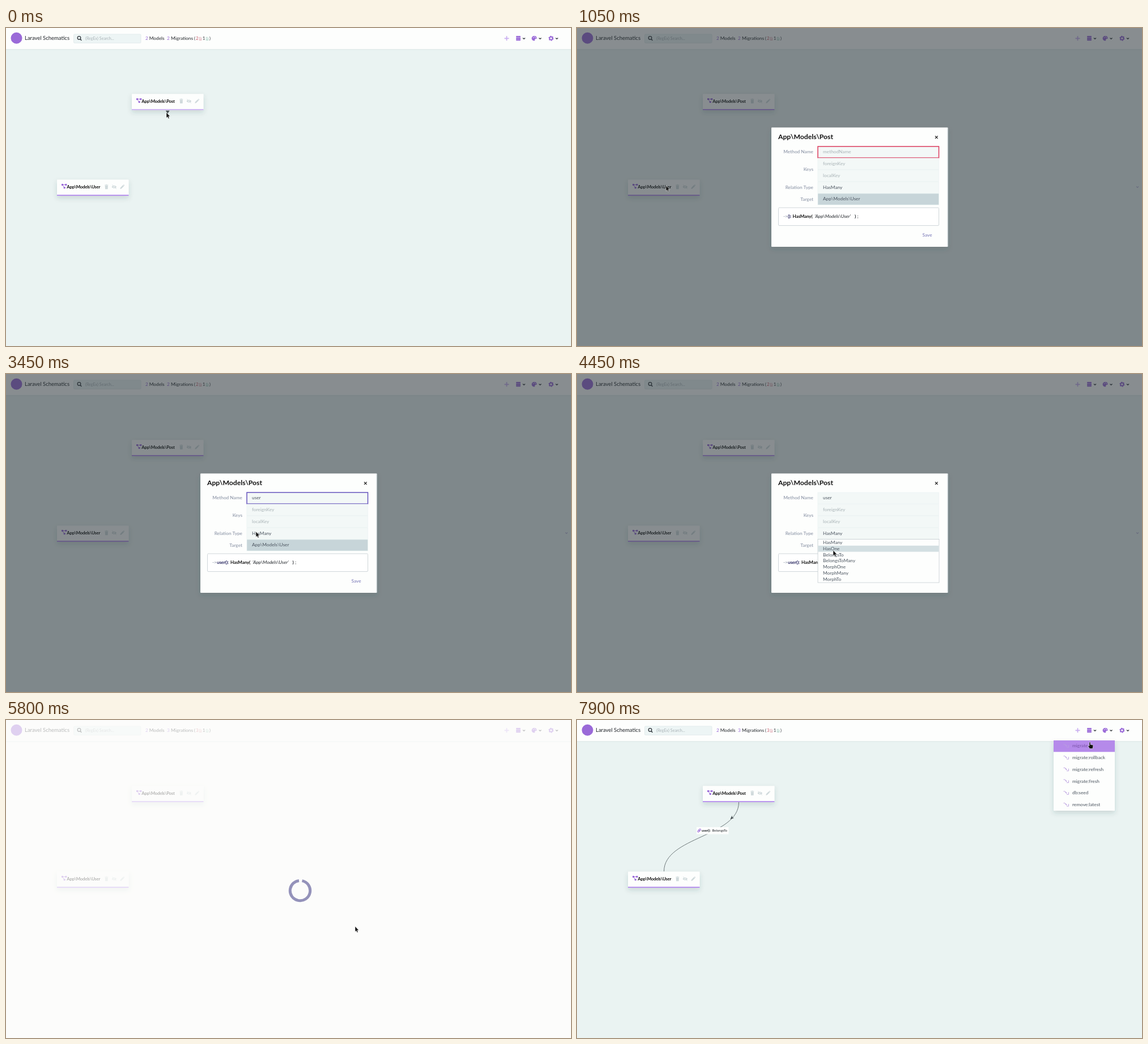
Recreate the animation shown at these times as an HTML page. Size 997 px wide and 561 px high, loop 8000 ms.

```html
<!DOCTYPE html>
<html lang="en">
<head>
<meta charset="utf-8">
<title>Schematics</title>
<style>
  html, body { margin: 0; width: 100%; height: 100%; overflow: hidden; background: #eaf3f2; }
  svg { display: block; width: 100%; height: 100%; }
  text { font: 8.3px Lato, sans-serif; fill: #1f2328; white-space: pre; }
  .line { fill: none; stroke: #606a6c; stroke-width: .9; }
  .accent { fill: #9a6ad8; }
  .muted { fill: #d0dadc; }
  .label { fill: #8b94a6; text-anchor: end; font-weight: 500; }
  .hint { fill: #a9b3b7; }
  .field { fill: #f3f8f7; stroke: #e8f0f0; stroke-width: .6; }
  .value { fill: #4c5560; }
  .bold { font-weight: 700; }
  .name { font-size: 7.8px; font-weight: 700; letter-spacing: -.25px; fill: #111; }
  .tiny { font-size: 6px; }
</style>
</head>
<body>
<svg viewBox="0 0 997 561" preserveAspectRatio="none">
  <defs>
    <filter id="shadow" x="-20%" y="-40%" width="140%" height="220%">
      <feDropShadow dx="0" dy="4" stdDeviation="4" flood-color="#33454c" flood-opacity=".17"/>
    </filter>
    <g id="chevron"><path d="M-2-1 0 1 2-1" fill="none" stroke="#33383d" stroke-width="1.2"/></g>
    <g id="sheet"><path d="M0 0h2.7l1.3 1.3V5H0zM1 2.3h2M1 3.6h2" fill="none" stroke="currentColor" stroke-width=".7"/></g>
    <g id="tree">
      <path d="M1.5 1.5H7.5M1.5 1.5 5 7" stroke="#9a6ad8" stroke-width=".9"/>
      <path class="accent" d="M0 0h3v3H0zM6.3 0h3v3h-3zM3.7 5.2h3v3h-3z"/>
    </g>
    <g id="tools" class="muted">
      <path d="M-3-3.8h2l.5-.7h1l.5.7h2v1h-6zM-2.6-2.3h5.2L2.3 4h-4.6z"/>
      <path d="M9 0q4.5-5 9 0-4.5 5-9 0z"/>
      <circle cx="13.5" r="1.4" fill="#fff"/>
      <path d="M10-3.4 17.4 3.4" stroke="#d0dadc"/>
      <path d="M24 3.8l.5-2.3 4.6-4.6 1.8 1.8-4.6 4.6zM29.6-3.5l.8-.7 1.7 1.7-.8.7z"/>
    </g>
  </defs>

  <rect id="stage" width="997" height="561"/>

  <g id="header">
    <rect width="997" height="37.5" fill="#fdfefd"/>
    <path d="M0 38H997" stroke="#dbe4e5"/>
    <circle class="accent" cx="18.5" cy="17.8" r="10"/>
    <text x="33" y="21.3" style="font-size:9.5px">Laravel Schematics</text>
    <rect x="119.5" y="11" width="118.500" height="15.500" rx="1.500" fill="#edf5f5" stroke="#dfe9ea" stroke-width=".8"/>
    <path d="M131 19.600 133.300 22" stroke="#30363b" stroke-width="1.500"/>
    <circle cx="129" cy="17.500" r="2.800" fill="none" stroke="#30363b" stroke-width="1.300"/>
    <text class="hint" x="140" y="20.600" style="font-size:7.1px">(RegEx) Search...</text>
    <text class="accent" x="246" y="21.300">2</text><text x="252.800" y="21.300">Models</text>
    <text id="migrations" class="accent" x="284" y="21.300"></text><text x="291" y="21.300">Migrations</text>
    <text x="332" y="21.300" style="font-size:7px">(</text>
    <text id="pending" x="335.300" y="21.300" style="font-size:7px;fill:#c34a5c"></text>
    <use href="#sheet" x="341" y="16.500" color="#dc9ca6"/>
    <text x="347" y="21.300" style="font-size:7px">1</text>
    <use href="#sheet" x="353" y="16.500" color="#9cc9bb"/>
    <text x="359" y="21.300" style="font-size:7px">)</text>
    <path d="M879.500 18.300h8M883.500 14.300v8" stroke="#c9aef0" stroke-width="1.700"/>
    <g class="accent">
      <rect x="900" y="14" width="8" height="2.500" rx="1"/>
      <rect x="900" y="16.900" width="8" height="2.300" rx=".5"/>
      <rect x="900" y="19.600" width="8" height="2.600" rx="1"/>
      <path d="M932.500 14a4.300 4.300 0 1 0 0 8.500q1.500-.5.600-2.200 0-1.100 1.500-1.100 2.200.2 2.200-1.700Q936 14 932.500 14z"/>
    </g>
    <g fill="#fff"><circle cx="930.500" cy="17" r=".7"/><circle cx="932.700" cy="15.700" r=".7"/><circle cx="934.800" cy="17" r=".7"/></g>
    <circle cx="961.800" cy="18.200" r="2.600" fill="none" stroke="#9a6ad8" stroke-width="2"/>
    <circle cx="961.800" cy="18.200" r="3.900" fill="none" stroke="#9a6ad8" stroke-width="1.300" stroke-dasharray="2 2.084"/>
    <use href="#chevron" x="914" y="18.500"/><use href="#chevron" x="942.500" y="18.500"/><use href="#chevron" x="972" y="18.500"/>
  </g>

  <path id="drag" class="line"/>
  <g id="relation">
    <path class="line" d="M285.500 145C285.500 206 153.500 206 153.500 267"/>
    <path d="M270.500 175 273.500 168.500 274 171.800 277 173z" fill="#454d50"/>
    <rect x="211" y="189" width="56.500" height="12.500" fill="#fdfefd"/>
    <g fill="none" stroke="#9a6ad8" stroke-width="1" transform="rotate(-45 215.500 195)">
      <rect x="212.200" y="193.700" width="4" height="2.600" rx="1.300"/><rect x="215" y="193.700" width="4" height="2.600" rx="1.300"/>
    </g>
    <text class="tiny bold" x="220" y="197.200" style="letter-spacing:-.1px">user():</text>
    <text class="tiny" x="238.500" y="197.200">BelongsTo</text>
  </g>
  <g id="cards"></g>
  <path id="anchor" d="M281.800 145.800h6.800l-3.400 5.200z" fill="#454d50"/>

  <g id="menu"></g>

  <g id="dialog">
    <rect width="997" height="561" fill="#283237" opacity=".55"/>
    <path d="M987-.9 989 1 991-.9" transform="translate(0 280.500)" fill="none" stroke="#5b5a78"/>
    <rect x="343" y="175.500" width="311.500" height="210.500" rx="1" fill="#fdfefd" filter="url(#shadow)"/>
    <path d="M653.700 176V386" stroke="#dbe5e8"/>
    <text class="bold" x="355" y="196" style="font-size:12.200px;fill:#111">App\Models\Post</text>
    <path d="M632 190.500l4.600 4.600m0-4.600-4.600 4.600" stroke="#222" stroke-width="1.200"/>
    <g id="fields"></g>
    <rect x="355.500" y="317" width="283" height="31.500" rx="1.500" fill="#fff" stroke="#cbd3d6" stroke-width=".9"/>
    <text x="364" y="335" class="label" style="text-anchor:start">-&gt;</text>
    <text id="method" class="bold" x="372" y="335" style="fill:#2c2a63;letter-spacing:-.25px"></text>
    <g id="call">
      <text id="callName" class="bold" y="335" style="font-size:8px;letter-spacing:-.1px;fill:#111"></text>
      <g id="callArgs">
        <text y="335" style="font-style:italic">'App\Models\User'</text>
        <text class="bold" x="70.500" y="335">)</text><text x="75" y="335">;</text>
      </g>
    </g>
    <rect id="saveRing" x="601" y="352.500" width="34" height="25.500" rx="1" fill="#f8fbfb" stroke="#ef7f9d" stroke-width="1.200"/>
    <text id="save" x="618" y="367.800" text-anchor="middle">Save</text>
    <g id="options"></g>
  </g>

  <g id="loading">
    <rect width="997" height="561" fill="#fcfdfb" opacity=".7"/>
    <circle id="spinner" cx="519" cy="301" r="17.700" fill="none" stroke="#9492ba" stroke-width="5" pathLength="100" stroke-dasharray="95 5"/>
  </g>

  <g id="cursor" stroke="#fff" stroke-width=".5">
    <path id="arrow" d="M0 0V9.600L2.100 7.700 3.600 11 5.200 10.300 3.800 7H6.500z" fill="#111"/>
    <path id="hand" d="M-1 .6Q0-.8 1 .6V4.300L5 5Q6 5.300 5.800 6.800L5 11.500H-.3L-3 7.200Q-3.300 5.800-2 6L-1 7z" fill="#111"/>
  </g>
</svg>

<script>
const $ = id => document.getElementById(id);
const show = (id, on) => { $(id).style.display = on ? '' : 'none'; };
const attrs = (id, values) => { for (const key in values) $(id).setAttribute(key, values[key]); };
const write = (id, text) => { if ($(id).textContent !== text) $(id).textContent = text; };

const card = (id, x, y, name) => `<g transform="translate(${x} ${y})">
  <rect id="${id}Body" width="126.500" height="28.500" rx="1" filter="url(#shadow)"/>
  <rect id="${id}Edge" y="26.700" width="126.500" height="1.800"/>
  <use href="#tree" x="8" y="7.600"/>
  <text class="name" x="17.300" y="15.600">App\\Models\\${name}</text>
  <use href="#tools" x="87.300" y="12.700"/></g>`;
$('cards').innerHTML = card('post', 222, 116.3, 'Post') + card('user', 90, 267.5, 'User');

const field = (id, y) => `<rect id="${id}Box" class="field" x="425" y="${y}" width="213.500" height="20"/>
  <text id="${id}" class="value" x="434" y="${y + 12.3}"></text>`;
const label = (text, y) => `<text class="label" x="417" y="${y}">${text}</text>`;
$('fields').innerHTML =
  ['methodField', 'foreignField', 'keyField', 'typeField', 'targetField']
    .map((id, i) => field(id, 209 + i * 20.75)).join('') +
  label('Method Name', 221.3) + label('Keys', 252.3) + label('Relation Type', 283.6) + label('Target', 304.5);
$('foreignField').setAttribute('class', 'hint');
$('keyField').setAttribute('class', 'hint');
write('foreignField', 'foreignKey');
write('targetField', 'App\\Models\\User');
$('targetFieldBox').style.fill = '#c7d5d9';

const optionHeight = 10.8;
$('options').innerHTML = `<rect x="425" y="291.500" width="214" height="76.500" fill="#fdfefd" stroke="#bcc7ca" stroke-width=".7"/>` +
  `<rect id="optionMark" x="425.500" width="213" height="${optionHeight}" fill="#d3dfe2"/>` +
  ['HasMany', 'HasOne', 'BelongsTo', 'BelongsToMany', 'MorphOne', 'MorphMany', 'MorphTo']
    .map((name, i) => `<text class="value" x="434" y="${300 + i * optionHeight}">${name}</text>`).join('');

$('menu').innerHTML = `<rect x="841" y="36" width="108" height="124" fill="#fdfefd" filter="url(#shadow)"/>
  <rect id="menuMark" x="841" y="36" width="108" height="20.300" fill="#b58aea"/>` +
  ['migrate', 'migrate:rollback', 'migrate:refresh', 'migrate:fresh', 'db:seed', 'remove:latest'].map((name, i) => {
    const y = 45.5 + i * 20.75;
    return `<path d="M858.500 ${y - 2.5}q2-1.500 3 1t3 2.500M861.500 ${y - 2.5}l3 3M864 ${y + 2.8}h3.500v-4" fill="none" stroke="#b99ddf" stroke-width=".9"/>
      <text id="item${i}" class="value" x="874" y="${y + 2.8}">${name}</text>`;
  }).join('');

// time, x, y of the pointer tip
const pointer = [
  [0, 283, 149], [50, 283, 149], [900, 157, 278], [2200, 157, 278], [2480, 330, 352], [2750, 475, 320],
  [3100, 475, 320], [3450, 441, 278], [3650, 441, 278], [4150, 449, 300], [4250, 449, 300],
  [4450, 452, 311], [4550, 452, 311], [4600, 452, 316], [5100, 452, 316], [5600, 616, 364],
  [6250, 616, 364], [7050, 904, 17], [7350, 904, 17], [7850, 905, 39], [8000, 905, 39]
];
const ease = u => u * u * (3 - 2 * u);
function pointerAt(t) {
  const i = pointer.findIndex(k => k[0] > t);
  const [t0, x0, y0] = pointer[i - 1], [t1, x1, y1] = pointer[i];
  const u = ease((t - t0) / (t1 - t0));
  return [x0 + (x1 - x0) * u, y0 + (y1 - y0) * u];
}

function render(t) {
  const [x, y] = pointerAt(t);
  const dragging = t < 1050, open = t >= 1050 && t < 5800, loading = t >= 5800 && t < 5950;
  const overUser = t >= 850 && t < 1050;

  $('stage').style.fill = loading ? '#fcfdfb' : '#eaf3f2';
  const count = t < 5800 ? '2' : '3';
  write('migrations', count);
  write('pending', count);

  show('anchor', dragging);
  show('drag', dragging && t >= 50);
  const endX = x + 2.5, endY = y + 1, midY = (148 + endY) / 2;
  attrs('drag', { d: `M285.500 148C285.500 ${midY} ${endX} ${midY} ${endX} ${endY}` });
  attrs('postBody', { fill: '#fdfefd' });
  attrs('postEdge', { fill: dragging ? '#cbb2f2' : '#b48bee' });
  attrs('userBody', { fill: overUser ? '#f5f8f8' : '#fdfefd' });
  attrs('userEdge', { fill: overUser ? '#9a6fe0' : '#b48bee' });
  show('relation', t >= 5950);

  show('dialog', open);
  const typed = 'user'.slice(0, Math.max(0, Math.min(4, Math.floor((t - 1100) / 150))));
  write('methodField', typed || 'methodName');
  $('methodField').setAttribute('class', typed ? 'value' : 'hint');
  const focused = t < 3650;
  $('methodFieldBox').style.cssText = focused ? `stroke:${typed ? '#6553bd' : '#dc3a5c'};stroke-width:1.5` : '';
  const belongs = t >= 4950;
  write('keyField', belongs ? 'ownerKey' : 'localKey');
  write('typeField', belongs ? 'BelongsTo' : 'HasMany');
  write('method', typed + '():');
  write('callName', belongs ? 'BelongsTo(' : 'HasMany(');
  attrs('call', { transform: `translate(${380.500 + typed.length * 3.9} 0)` });
  attrs('callArgs', { transform: `translate(${belongs ? 41.5 : 39} 0)` });
  show('options', t >= 3650 && t < 4950);
  attrs('optionMark', { y: 292 + optionHeight * (t < 4300 ? 0 : t < 4600 ? 1 : 2) });
  const overSave = t >= 5550;
  show('saveRing', overSave);
  $('save').style.fill = overSave ? '#b5bfdc' : '#7472b5';

  show('loading', loading);
  attrs('spinner', { transform: `rotate(${-79 + (t - 5800) * .36} 519 301)` });

  show('menu', t >= 7200);
  const overItem = y > 35;
  show('menuMark', overItem);
  $('item0').style.fill = overItem ? '#7a55a8' : '';

  const hand = open && overSave || t >= 7000;
  show('arrow', !hand);
  show('hand', hand);
  attrs('cursor', { transform: `translate(${x} ${y})` });
}

const start = performance.now();
function tick() {
  render((performance.now() - start) % 8000);
  requestAnimationFrame(tick);
}
tick();
</script>
</body>
</html>
```
